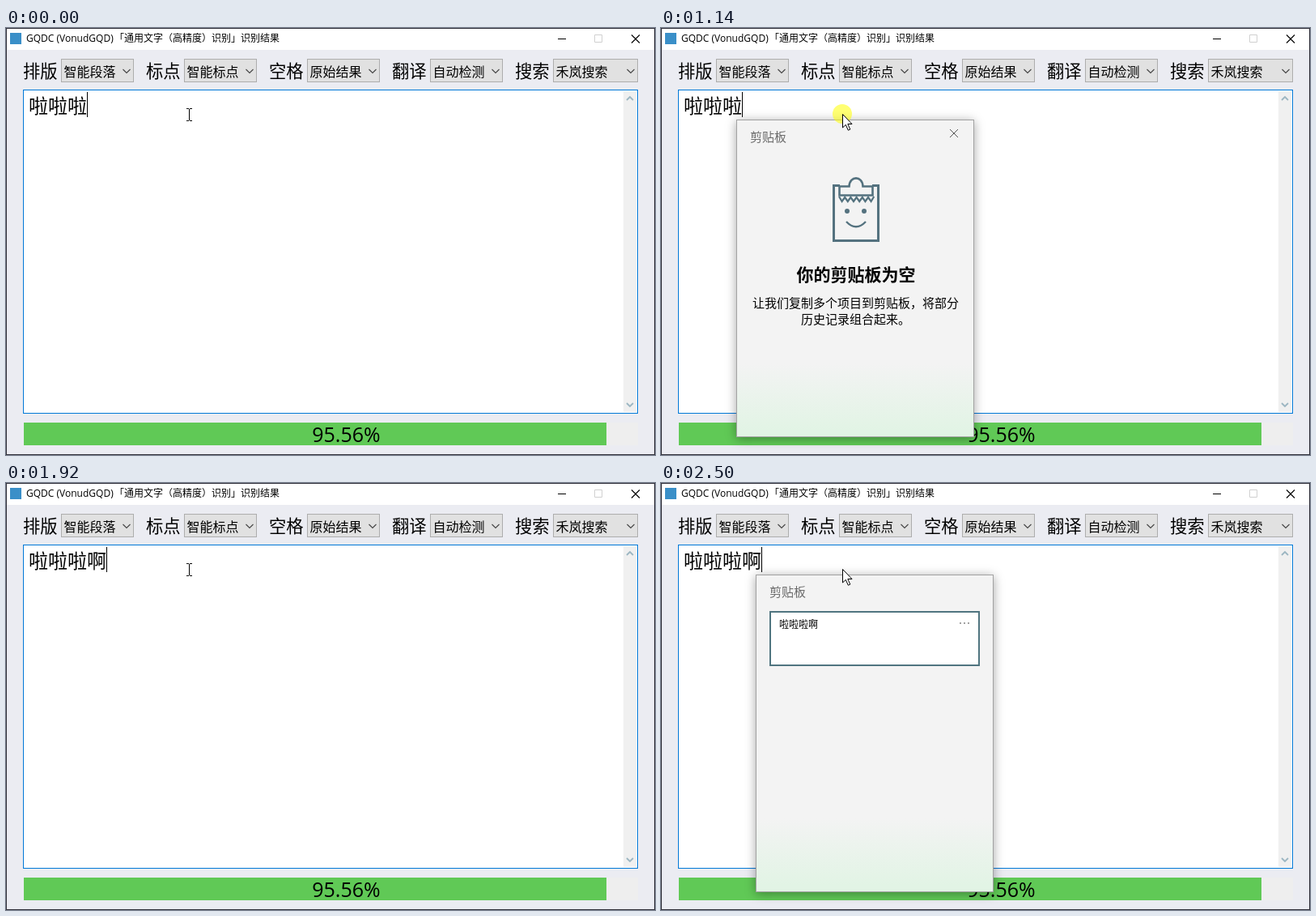
Recreate the animation shown at these times as an HTML page. Size 802 by 527 pixels, loop 2680 ms.

```html
<!DOCTYPE html>
<html lang="zh-CN">
<head>
<meta charset="utf-8">
<title>识别结果</title>
<style>
html, body { margin: 0; width: 100%; height: 100%; overflow: hidden; }
body { position: relative; background: #ebecf2; }
svg { position: absolute; left: 0; top: 0; }
text { font-family: "Open Sans", "Noto Sans CJK SC", "Noto Sans CJK", sans-serif; white-space: pre; }
.cjk { font-family: "Noto Sans CJK SC", "Noto Sans CJK", sans-serif; }
.line { fill: none; stroke: #000; }
.panel {
  position: absolute; left: 93px; top: 113px; width: 294px; height: 392px;
  box-sizing: border-box; border: 1px solid #a2a2a2;
  box-shadow: 0 2px 12px rgba(0, 0, 0, .36);
}
.filled { background: linear-gradient(#f3f3f3 77%, #e2f4e5 98%); }
.moved { left: 117px; }
[data-part] { visibility: hidden; }
</style>
</head>
<body>
<svg id="base" width="802" height="527"></svg>
<div class="panel" data-part="ghostA"></div>
<div class="panel filled" data-part="panelA"></div>
<div class="panel moved" data-part="ghostB"></div>
<div class="panel filled moved" data-part="panelB"></div>
<svg id="top" width="802" height="527"></svg>

<script>
const LOOP = 2680;

// Each step: start time and the parts on view.
const STEPS = [
  [0, 'caretA beam'],
  [690, 'caretA ghostA arrow'],
  [740, 'caretA panelA empty arrow'],
  [1140, 'caretA panelA empty click arrow'],
  [1220, 'caretA beam'],
  [1700, 'typed ime beam'],
  [1920, 'word caretB beam'],
  [2210, 'word beam'],
  [2440, 'word caretB ghostB arrow'],
  [2470, 'word caretB panelB heading arrow'],
  [2500, 'word caretB panelB heading card arrow']
].map(([at, parts]) => ({ at, parts: parts.split(' ') }));

const rect = (x, y, w, h, fill, more = '') =>
  `<rect x="${x}" y="${y}" width="${w}" height="${h}" fill="${fill}" ${more}/>`;
const line = (d, color = '#000', width = 1, more = '') =>
  `<path class="line" d="${d}" style="stroke:${color};stroke-width:${width}" ${more}/>`;
const text = (x, y, size, str, more = '') =>
  `<text x="${x}" y="${y}" font-size="${size}" ${more}>${str}</text>`;
const cjk = (x, y, size, str, more = '') => text(x, y, size, str, `class="cjk" ${more}`);
const part = (name, body) => `<g data-part="${name}">${body}</g>`;

function titleBar() {
  return rect(0, 0, 802, 27, '#fff') +
    rect(5, 6, 14, 14, '#3a8fc8') +
    text(25, 17, 12, 'GQDC (VonudGQD)') +
    cjk(134, 17, 12, '「通用文字（高精度）识别」识别结果') +
    line('M682 13.5h10') +
    line('M727.5 8.5h9v9h-9z', '#d0d0d0') +
    line('M773 8.5l10 10m0-10l-10 10', '#000', 1.1);
}

function combos() {
  const items = [
    ['排版', '智能段落'], ['标点', '智能标点'], ['空格', '原始结果'],
    ['翻译', '自动检测'], ['搜索', '禾岚搜索']
  ];
  return items.map(([label, value], i) => {
    const x = 68 + i * 152, w = i === 4 ? 105 : 90;
    return cjk(x - 47, 60.5, 21.3, label) +
      rect(x + .5, 38.5, w - 1, 28, '#e1e1e1', 'stroke="#adadad"') +
      cjk(x + 3.5, 59.5, 16, value) +
      line(`M${x + w - 13.5} 51l4.5 4.5l4.5-4.5`, '#444', 1.1);
  }).join('');
}

function editor() {
  return rect(21.5, 76.5, 759, 399, '#fff', 'stroke="#0078d7"') +
    rect(763, 78, 16, 396, '#f0f0f0') +
    line('M767 89l4-4l4 4M767 463l4 4l4-4', '#9cb6c2', 1.8) +
    cjk(28, 105, 24, '啦啦啦') +
    part('typed', text(100, 105, 24, 'a')) +
    part('word', cjk(100, 105, 24, '啊')) +
    part('caretA', rect(100, 79, 1, 31, '#000')) +
    part('caretB', rect(124, 79, 1, 31, '#000'));
}

function progress() {
  return rect(22, 487, 759, 28, '#eee') +
    rect(22, 487, 720, 28, '#60c956') +
    text(420.5, 511, 25, '95.56%', 'text-anchor="middle"');
}

function emptyNotice() {
  const ink = '#54727f';
  const mid = 'text-anchor="middle"';
  return cjk(110, 140, 15, '剪贴板', 'fill="#6a6a6a"') +
    line('M357 125l10 10m0-10l-10 10', '#555') +
    line('M221 194.5H213.5V262.5H268.5V194.5H261', ink, 3) +
    line('M220.5 206.5V195.5H232.5C233 182 249 182 249.5 195.5H261.5V206.5Z', ink, 2.6) +
    line('M220 208l3.6 6' + 'l3.6-5l3.6 5'.repeat(5) + 'l3.6-6', ink, 2.2) +
    `<circle cx="230" cy="226" r="3" fill="${ink}"/><circle cx="251" cy="226" r="3" fill="${ink}"/>` +
    line('M229 239Q241 251.5 253 239', ink, 2.4) +
    cjk(241, 312, 21, '你的剪贴板为空', mid + ' font-weight="700"') +
    cjk(113, 344.5, 15, '让我们复制多个项目到剪贴板，将部分') +
    cjk(173, 364.5, 15, '历史记录组合起来。');
}

function candidates() {
  const list = [...'啊āáǎà阿吖嗄锕'];
  let x = 113;
  const words = list.map((ch, i) => {
    const wide = ch > '一';
    const out = text(x, 139.5, 19, i + 1, `fill="${i ? '#6b6b6b' : '#555'}"`) +
      (wide ? cjk : text)(x + 19, 139.5, 18, ch);
    x += wide ? 61 : 53;
    return out;
  }).join('');
  return rect(100.5, 110.5, 632, 44, '#f3f3f3', 'stroke="#d8d8d8"') +
    rect(101, 111, 61, 43, '#969696') + words +
    line('M618.5 111v43M683.5 111v43', '#dadada') +
    line('M635.5 128l-5 5l5 5', '#aaa', 1.2) +
    line('M666.5 128l5 5l-5 5', '#000', 1.3) +
    '<circle class="line" cx="708" cy="133" r="7.5" stroke-width="1.3"/>' +
    '<circle cx="705.3" cy="131" r="1.1"/><circle cx="710.7" cy="131" r="1.1"/>' +
    line('M704 135q4 4.5 8 0', '#000', 1.2);
}

function card() {
  return rect(135, 159, 258, 66, '#fff', 'stroke="#507580" stroke-width="2"') +
    cjk(146, 179, 12, '啦啦啦啊', 'font-weight="500"') +
    [370, 375, 380].map(x => `<circle cx="${x}" cy="173" r=".9" fill="#777"/>`).join('');
}

document.getElementById('base').innerHTML =
  rect(0, 0, 802, 527, '#ebecf2') + titleBar() + combos() + editor() + progress() +
  rect(.5, .5, 801, 526, 'none', 'stroke="#30303a"');

document.getElementById('top').innerHTML =
  part('empty', emptyNotice()) +
  part('heading', cjk(134, 140, 15, '剪贴板', 'fill="#6a6a6a"')) +
  part('card', card()) +
  part('ime', candidates()) +
  part('click', '<circle cx="224" cy="106" r="12" fill="#ff0" fill-opacity=".55"/>') +
  part('beam', line('M223 99.5h3m1 0h3M226.5 100v14M223 114.5h3m1 0h3')) +
  part('arrow', '<path d="M224.5 106.5v16.5l3.8-3.6l3 6.8l2.5-1.1l-3-6.6h5.2z" fill="#fff" stroke="#000"/>');

const parts = [...document.querySelectorAll('[data-part]')];
const start = performance.now();
let shown = null;

function draw() {
  const t = (performance.now() - start) % LOOP;
  const step = STEPS.findLast(s => s.at <= t) || STEPS[0];
  if (step !== shown) {
    shown = step;
    for (const el of parts)
      el.style.visibility = step.parts.includes(el.dataset.part) ? 'visible' : 'hidden';
  }
  requestAnimationFrame(draw);
}
draw();
</script>
</body>
</html>
```
